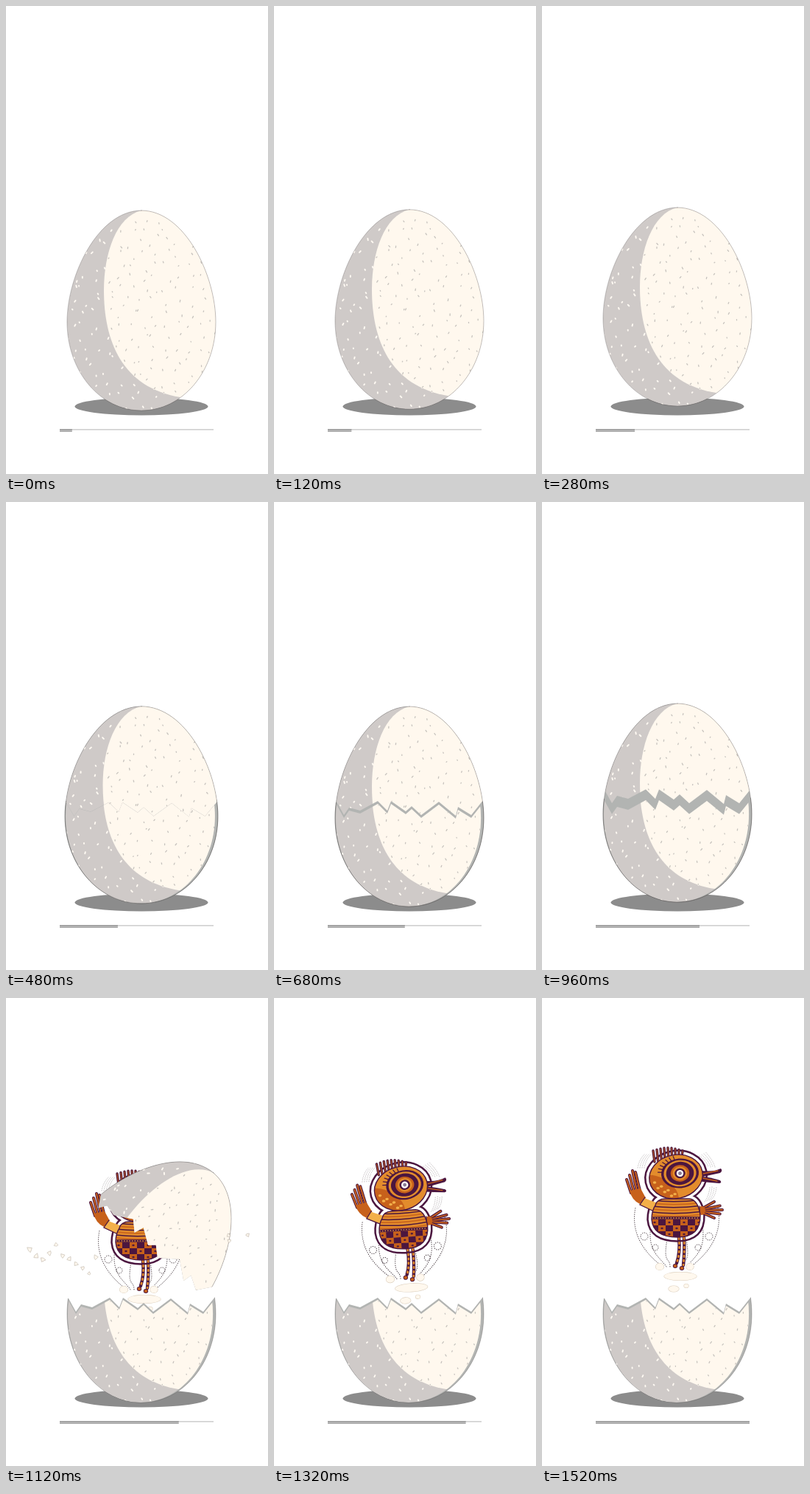
Animation of 356 by 634 pixels, one loop 1.56 s. Source, as an HTML page with a canvas:

```html
<!DOCTYPE html>
<html lang="en">
<head>
<meta charset="utf-8">
<title>Hatching egg</title>
<style>
html, body { margin: 0; width: 100%; height: 100%; overflow: hidden; background: #fff; }
canvas { display: block; width: 356px; height: 634px; }
</style>
</head>
<body>
<canvas id="stage"></canvas>
<script>
const W = 356, H = 634, LOOP = 1560, STEP = 40;
const HOP = 680, CRACK = 440, SPLIT = 960, OPEN = 1000, LID_GONE = 1320;
const GREY = '#cfcac8', CREAM = '#fff8ee', RIM = '#b2b4b2';
const PLUM = '#4b163f', ORANGE = '#e38c2c', RUST = '#c7611b', GOLD = '#f3b04a';
const { sin, cos, max, min, PI } = Math;

const canvas = document.getElementById('stage');
const c = canvas.getContext('2d');
const dpr = window.devicePixelRatio || 1;
canvas.width = W * dpr;
canvas.height = H * dpr;

const egg = new Path2D('M184 277C125 277 83 365 83 428C83 495 128 548 184 548C240 548 285 495 285 428C285 365 243 277 184 277Z');
const lit = new Path2D('M184 277C150 285 133 335 133 385C133 453 157 517 237 530L300 540V270Z');
const zig = '85 407L95 425L102 415L117 419L141 406L154 419L159 406L179 420L187 413L200 425L224 407L247 426L250 414L268 425L284 405';
const above = new Path2D(`M60 407L${zig}L310 405V200H60Z`);
const below = new Path2D(`M60 407L${zig}L310 405V600H60Z`);

let seed = 7;
const rnd = (a, b) => a + (b - a) * (seed = seed * 16807 % 2147483647) / 2147483647;

const specks = new Path2D();
for (let y = 288; y < 545; y += 16)
  for (let x = 90; x < 285; x += 16) {
    const px = x + rnd(-7, 7), py = y + rnd(-7, 7), a = rnd(.8, 2.4), l = rnd(.8, 2.6);
    specks.moveTo(px, py);
    specks.lineTo(px + cos(a) * l, py + sin(a) * l);
  }

// Where each shard is 120 ms after the shell opens
const shards = Array.from({ length: 14 }, (_, i) => i < 11
  ? { x: 32 + i * 9, y: rnd(320, 350) + i * 3, size: rnd(2, 4) }
  : { x: rnd(302, 329), y: rnd(315, 346), size: 2.5 });

const times = (n, draw) => { for (let i = 0; i < n; i++) draw(i); };

function layer(draw) { c.save(); draw(); c.restore(); }

// Moves and turns the drawing about a fixed point
function pose(x, y, dx, dy, deg) {
  c.translate(x + dx, y + dy);
  c.rotate(deg * PI / 180);
  c.translate(-x, -y);
}

function oval(x, y, rx, ry, color, rot = 0) {
  c.beginPath();
  c.ellipse(x, y, rx, ry, rot, 0, 7);
  c.fillStyle = color;
  c.fill();
}

const asPath = d => typeof d === 'string' ? new Path2D(d) : d;

function stroke(d, color, width, dash = []) {
  c.setLineDash(dash);
  c.strokeStyle = color;
  c.lineWidth = width;
  c.stroke(asPath(d));
}

function fill(d, color) {
  c.fillStyle = color;
  c.fill(asPath(d));
}

// Plum stick with a coloured core
function stick(d, width, core, color = RUST, dash = []) {
  stroke(d, PLUM, width);
  stroke(d, color, core, dash);
}

function clipAt(path, dy) {
  c.translate(0, dy);
  c.clip(path);
  c.translate(0, -dy);
}

function shell() {
  layer(() => {
    c.clip(egg);
    fill(egg, GREY);
    stroke(specks, '#fffaf3', 1.9);
    fill(lit, CREAM);
    c.clip(lit);
    stroke(specks, '#c6c2bd', 1.3);
  });
}

const outline = () => stroke(egg, 'rgba(70,65,65,.4)', .8);

function bowl() {
  layer(() => {
    clipAt(below, 0);
    fill(egg, RIM);
    outline();
  });
  layer(() => {
    c.clip(egg);
    clipAt(below, 3);
    c.translate(182.5, 0);
    c.scale(.976, 1);
    c.translate(-184, 0);
    shell();
  });
}

function closedEgg(t) {
  const p = t / HOP % 1;
  const lift = sin(PI * p) ** 2, squash = max(0, -sin(2 * PI * p));
  layer(() => {
    c.translate(184, 548 - 6.5 * lift);
    c.scale(1 + .03 * squash, 1 - .008 * lift - .01 * squash);
    c.translate(-184, -548);
    if (t < CRACK) {
      shell();
    } else {
      const gap = 15 * ((t - CRACK) / (SPLIT - CRACK)) ** 1.7 - 3;
      fill(egg, RIM);
      bowl();
      layer(() => { clipAt(above, -gap); shell(); });
    }
    outline();
  });
}

function lid(t) {
  const u = (t - SPLIT) / 160;
  layer(() => {
    pose(184, 370, 38 * u ** 2.5, -62 * u * (2 - u), 40 * u);
    clipAt(above, -11);
    fill(egg, RIM);
    layer(() => { clipAt(above, -2); shell(); });
    outline();
  });
}

function debris(t) {
  const p = (t - OPEN) / 120;
  layer(() => {
    c.globalAlpha = min(1, max(0, (1300 - t) / 100));
    shards.forEach(({ x, y, size: s }, i) => layer(() => {
      c.translate(184 + (x - 184) * p, 400 + (y - 400) * p);
      c.rotate(i * 1.3 + p);
      const d = `M${-s} 1L0 ${-s}L${s} 1L1 2Z`;
      fill(d, CREAM);
      stroke(d, '#c9c1b6', .7);
    }));
  });
}

const head = new Path2D();
head.ellipse(182, 242, 36.5, 29.5, -.2, 0, 7);
const torso = new Path2D('M154 281Q156 272 168 272H200Q212 273 215 294Q216 324 184 324Q151 324 149 300Q149 288 154 281Z');

function plume() {
  for (const side of [-1, 1]) {
    const x = d => 183 + side * d;
    times(3, i => {
      const far = 58 - i * 22, top = 284 + i * 19;
      stroke(`M${x(19 - i * 5)} 364C${x(far * .65)} 350 ${x(far + 6)} ${top + 40} ${x(far - 2)} ${top}`, '#3d3037', 1, [.5, 2.3]);
    });
    times(2, i => {
      const r = 5 - i, cx = x(44 - i * 15), cy = 323 + i * 15;
      stroke(`M${cx - r} ${cy}a${r} ${r} 0 1 0 ${2 * r} 0a${r} ${r} 0 1 0 ${-2 * r} 0`, '#3d3037', 1, [.5, 2.3]);
    });
  }
  const puff = (x, y, rx, ry) => {
    oval(x, y, rx + .6, ry + .6, '#ddd0bf');
    oval(x, y, rx, ry, CREAM);
  };
  puff(188, 377, 22, 5.5);
  puff(160, 364, 5.5, 4.5);
  puff(201, 364, 5, 4.5);
  puff(179, 394, 7, 4);
  puff(196, 390, 3, 2.5);
}

function halo() {
  times(4, i => {
    const r = i * 3;
    stroke(`M${214 + r} ${214 - r / 2}Q${224 + r} 221 ${226 + r} 229`, '#a9a2a5', .8, [.5, 2]);
    stroke(`M${221 + r} ${276 - r / 3}Q${227 + r} 268 ${228 + r} 256`, '#a9a2a5', .8, [.5, 2]);
    stroke(`M${139 - r} 230Q${141 - r} 219 ${148 - r} 212`, '#a9a2a5', .8, [.5, 2]);
  });
  stroke(head, PLUM, 13.5);
  stroke(torso, PLUM, 13.5);
  stroke(head, '#fff', 8.5);
  stroke(torso, '#fff', 8.5);
}

function limbs() {
  times(2, i => {
    const x = 181 + i * 9, y = 363 + i * 3;
    stick(`M${186 + i * 7} 325Q${188 + i * 6} 345 ${x + 2} ${y - 4}`, 4.4, 2.6, ORANGE, [1.5, 4.5]);
    oval(x, y, 3.2, 3, PLUM);
    oval(x, y, 2.4, 2, RUST);
  });

  times(4, i => stick(`M${121 + i * 4} ${264 - i}L${115 + i * 4} ${246 - i * 6 + (i > 2) * 8}`, 4, 2));
  fill('M119 261L134 258L141 271L133 279Q122 274 119 261Z', RUST);
  fill('M139 271L157 278L152 289L133 280Z', GOLD);
  stroke('M140 270L133 280L152 289', PLUM, 1.3);

  times(5, i => stick(`M218 ${285 + i * 1.5}L${234 + sin(i / 4 * PI) * 11} ${276 + i * 5.5}`, 4, 1.8));
  oval(217, 288, 5, 6, RUST);
  stroke('M214 282V294', PLUM, 1.3);
}

function drawTorso() {
  fill(torso, ORANGE);
  layer(() => {
    c.clip(torso);
    times(6, i => {
      const y = 274 + i * 4;
      stroke(`M148 ${y}Q182 ${y + 4} 218 ${y - 1}`, i % 2 ? RUST : PLUM, 1.5);
    });
    stroke('M146 298H220', PLUM, 3.6);
    stroke('M150 298H216', GOLD, 1.4, [.2, 3.4]);
    times(21, i => {
      const col = i % 7, row = (i - col) / 7, dark = (row + col) % 2;
      const x = 148 + col * 10, y = 300 + row * 8;
      c.fillStyle = dark ? PLUM : RUST;
      c.fillRect(x, y, 10.1, 8.1);
      if (!dark) oval(x + 5, y + 4, 1.7, 1.2, PLUM);
    });
  });
  stroke(torso, PLUM, 1.4);
}

function drawHead() {
  times(9, i => {
    const x = 153 + i * 4.7, y = 222 - i * 1.4;
    stick(`M${x} ${y}L${x - 2 + i * .3} ${207 - sin(i / 8 * PI) * 4}`, 3.4, 1);
  });
  fill('M212 233Q230 237 243 231Q246 234 242 237L214 243Z', PLUM);
  fill('M212 241Q230 243 242 247Q245 250 241 251Q226 250 211 248Z', PLUM);
  stroke('M219 238L239 234M218 244L238 248', RUST, 1.3);

  fill(head, ORANGE);
  layer(() => {
    c.clip(head);
    oval(157, 262, 31, 19, RUST, .5);
    times(7, i => oval(153 + i * 4.6, 250 + i * 2.6 + (i % 2) * 5, 2.3, 1.7, GOLD));
  });
  stroke(head, PLUM, 1.4);

  const [ex, ey] = [187.5, 237.5];
  times(7, i => {
    const a = 3.2 + i * .2, at = r => `${ex + cos(a) * r * 1.25} ${ey + sin(a) * r}`;
    stroke(`M${at(18)}L${at(24)}`, PLUM, 1.3);
  });
  const rings = [PLUM, ORANGE, PLUM, PLUM, RUST, ORANGE, PLUM, '#fff', '#8b7c93'];
  rings.forEach((color, i) => {
    const r = 20 - i * 2.2;
    oval(ex, ey, r * (1.28 - i * .035), r, color, -.1);
  });
}

function bird(t) {
  const burst = max(0, 1 - (t - SPLIT) / 160);
  const sway = t > 1120 ? sin((t - 1120) / 400 * PI) : 0;
  layer(() => {
    pose(186, 365, -2 * sway, (1520 - t) * .0775 + 47 * burst, -3.5 * sway);
    plume();
    halo();
    limbs();
    drawTorso();
    drawHead();
  });
}

function bar(t) {
  const length = min(209, 16.8 + t * .1294);
  const strip = (color, y, w, h) => { c.fillStyle = color; c.fillRect(73, y, w, h); };
  strip('#b4b4b4', 573.4, 209, 1);
  strip('#b1b1b1', 573, length, 4);
  strip('#989898', 573, length, 1);
}

function render(t) {
  c.setTransform(dpr, 0, 0, dpr, 0, 0);
  c.fillStyle = '#fff';
  c.fillRect(0, 0, W, H);
  c.lineCap = 'round';
  oval(184, 542.5, 90.5, 12, '#8c8c8c');
  if (t < OPEN) {
    closedEgg(t);
  } else {
    bird(t);
    if (t < LID_GONE) lid(t);
    bowl();
    debris(t);
  }
  bar(t);
}

const start = performance.now();
function tick() {
  const t = (performance.now() - start) % LOOP;
  render(Math.floor(t / STEP) * STEP);
  requestAnimationFrame(tick);
}
tick();
</script>
</body>
</html>
```
